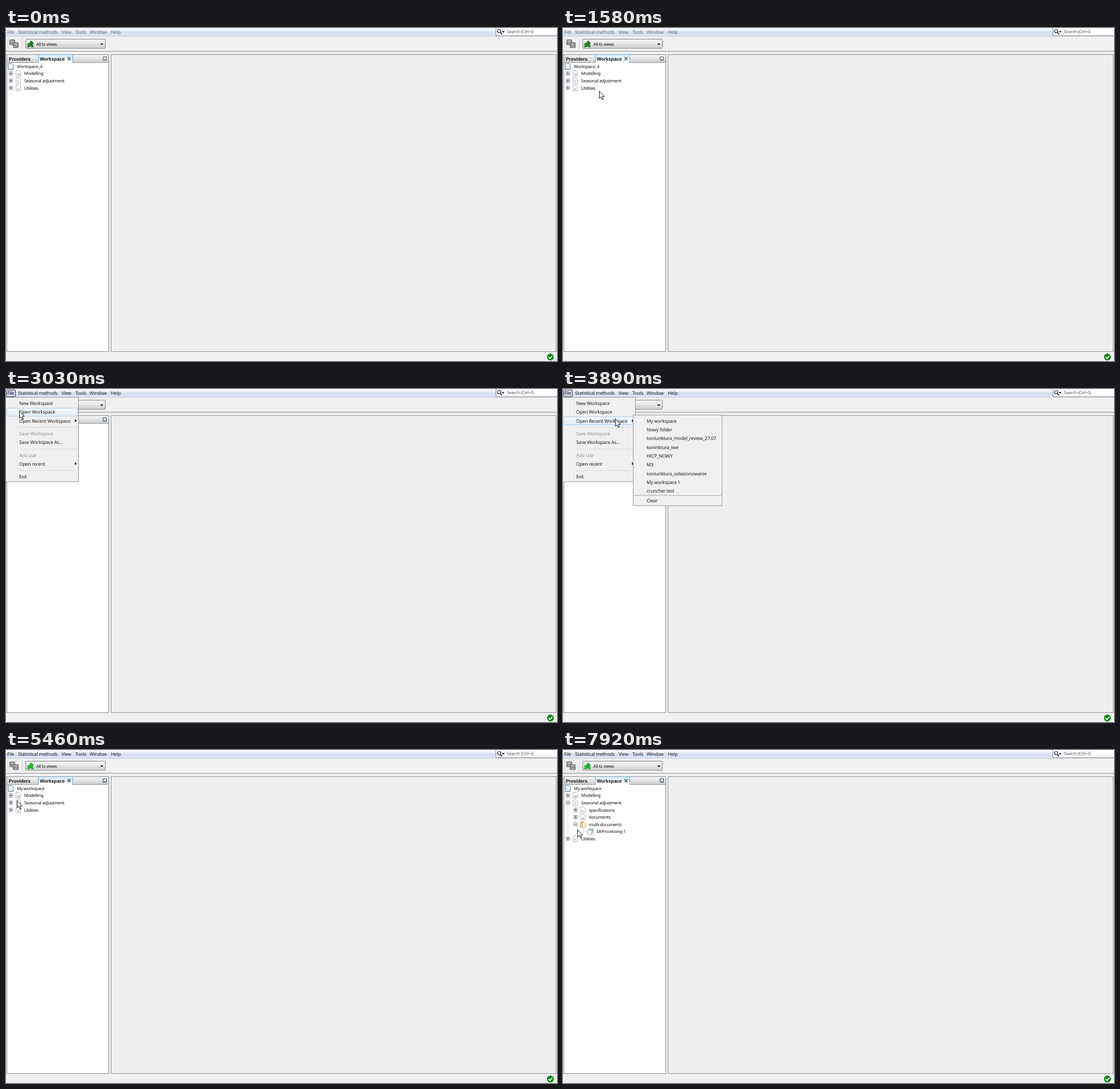
Write an HTML page that moves like this. It is 962 px wide and 582 px high and loops after 8 s.

```html
<!DOCTYPE html>
<html lang="en">
<head>
<meta charset="utf-8">
<title>Opening a workspace</title>
<style>
html, body { margin: 0; width: 100%; height: 100%; overflow: hidden; background: #f0f0f0; }
svg { display: block; width: 962px; height: 582px; }
text { text-rendering: geometricPrecision; white-space: pre; fill: #111; }
.tree { font: 7.6px "Noto Sans", sans-serif; letter-spacing: -.24px; }
.menu { font: 8.2px "Open Sans", sans-serif; letter-spacing: -.18px; }
.tab { font: bold 8.2px "Liberation Sans", sans-serif; }
.mini { font: 5px "Noto Sans", sans-serif; fill: #666; }
.off { fill: #8c8c84; }
#bar text { fill: #6d6d6d; }
.active #bar text { fill: #111; }
.puzzle { fill: #237a27; }
.active .puzzle { fill: #28b02e; }
.mark { stroke: #555; }
.active .mark { stroke: #25405c; }
</style>
</head>
<body>
<svg id="stage" viewBox="0 0 962 582"></svg>
<script>
const LOOP = 8000;
const MENU_OPEN = 2350, SUB_OPEN = 3580, PICKED = 4580, EXPAND = 6220, EXPAND_MULTI = 7370;

const rect = (x, y, w, h, fill, stroke = 'none', extra = '') =>
  `<rect x="${x}" y="${y}" width="${w}" height="${h}" fill="${fill}" stroke="${stroke}" ${extra}/>`;
const path = (d, fill = 'none', stroke = 'none', extra = '') =>
  `<path d="${d}" fill="${fill}" stroke="${stroke}" ${extra}/>`;
const text = (x, cy, s, cls = 'tree') => `<text x="${x}" y="${cy + 2.8}" class="${cls}">${s}</text>`;
const group = (id, body, extra = '') => `<g id="${id}" ${extra}>${body}</g>`;
const fade = (id, ...stops) => `<linearGradient id="${id}" x2="0" y2="1">` +
  stops.map(([o, c]) => `<stop offset="${o}" stop-color="${c}"/>`).join('') + '</linearGradient>';

const defs = `<defs>${
  fade('barFill', [0, '#fbfcfe'], [.4, '#e6ebf5'], [.45, '#d5dcec'], [1, '#dce3f2'])}${
  fade('comboFill', [0, '#f3f3f3'], [.5, '#e9e9e9'], [.52, '#dedede'], [1, '#d2d2d2'])}${
  fade('headFill', [0, '#f4f4f4'], [.5, '#e4e4e4'], [1, '#cbcbcb'])}${
  fade('tabFill', [0, '#d8ecf9'], [.5, '#e8f4fc'], [1, '#fbfdff'])}${
  fade('pageFill', [0, '#ffffff'], [1, '#d3e2f3'])}${
  fade('hoverFill', [0, '#f3f7fc'], [1, '#e4eefb'])}</defs>`;

function menuBar() {
  const items = [[2, 'File'], [21, 'Statistical methods'], [97, 'View'], [121, 'Tools'], [146, 'Window'], [183, 'Help']];
  return rect(0, 0, 962, 14, 'url(#barFill)') + rect(0, 14, 962, 1, '#c9cedb') +
    group('fileButton', rect(.5, 1.5, 16, 12, '#cdd4e6', '#4b4f5c', 'rx="1.5"')) +
    group('bar', items.map(([x, s]) => text(x, 7.5, s, 'menu')).join('')) +
    rect(855.5, -.5, 107, 14, '#fff', '#8b909b') +
    '<circle cx="861" cy="5.5" r="3" fill="#dcebf7" stroke="#333" stroke-width="1.2"/>' +
    path('M863.2 7.8l3 3.2', 'none', '#222', 'stroke-width="1.8"') +
    path('M865.5 5.5h5l-2.5 2.8z', '#111') +
    `<g opacity=".7">${text(874.5, 6.5, 'Search (Ctrl+I)')}</g>`;
}

function toolBar() {
  const grip = x => path(`M${x} 19v18`, 'none', '#9a9a9a', 'stroke-dasharray="1 1.5"');
  const disk = (x, y) => rect(x, y, 9, 9, '#8d8d8d', '#6f6f6f', 'rx="1"') +
    rect(x + 2, y + 1, 5, 3, '#b9b9b9') + rect(x + 2, y + 6, 5, 2.5, '#a6a6a6');
  return rect(0, 40, 962, 1, '#a2a2a2') + rect(0, 41, 962, 1, '#dcdcdc') +
    grip(3.5) + grip(28.5) + disk(6.5, 20.5) + disk(12.5, 25.5) +
    rect(34.5, 19.5, 139, 16, 'url(#comboFill)', '#8a8a8a', 'rx="1.5"') +
    '<path class="puzzle" d="M37 27h3v-1.5h2V22.500h4V25h2v3.500h-1.500v1.500H48v3.500h-4v-1.500h-2v1.500h-5v-3h1.500v-1.500H37z"/>' +
    text(53, 28, 'All ts views') + path('M164.500 27h5.500l-2.750 3z', '#111');
}

function panels() {
  return rect(1.5, 46.5, 178, 519, '#fff', '#8c8f95') +
    rect(2, 47, 177, 13, 'url(#headFill)') + rect(2, 60, 177, 1, '#a5a9ae') +
    rect(56.5, 46.5, 60, 14, 'url(#tabFill)', '#76a7c8') + rect(57, 60, 59, 1, '#fff') +
    text(5, 53.8, 'Providers', 'tab') + text(59, 53.8, 'Workspace', 'tab') +
    '<path class="mark" d="M107.500 51l5 5m0-5l-5 5M107.500 51h1.500m2 0h1.500M107.500 56h1.500m2 0h1.500" fill="none" stroke-width="1.1"/>' +
    '<path class="mark" d="M169.500 50.500h6v6h-6zM171 54.500h3" fill="#f6f6f6"/>' +
    rect(183.5, 46.5, 777, 519, '#efefef', '#8f9298') +
    '<circle cx="950.5" cy="575" r="6" fill="#11851a"/>' +
    path('M947.300 575.200l2.400 2.400 4.200-4.800', 'none', '#fff', 'stroke-width="1.7"');
}

function page(x, cy, letter) {
  const y = cy - 5;
  if (letter === '=') {
    return path(`M${x} ${y + .5}h5v9h-5z`, '#f3d67c', '#c19a3a', 'stroke-width=".8"') +
      path(`M${x + 3} ${y + 1.5}h4l2 2v6.500h-6z`, '#fdf6dd', '#a88d4b', 'stroke-width=".8"');
  }
  if (letter === '+') {
    return path(`M${x + 2} ${y}h7v8h-7z`, '#eef4f8', '#7d93a0', 'stroke-width=".8"') +
      path(`M${x - .500} ${y + 2}h5l2 2v6h-7z`, '#fff', '#7d93a0', 'stroke-width=".8"') +
      path(`M${x + 5} ${y + 2}h2.500v3`, 'none', '#3f8f9c');
  }
  return path(`M${x + .5} ${y}h5.500l2.500 2.500v7.500h-8z`, '#fbfbfb', '#a3a8ad', 'stroke-width=".8"') +
    `<text x="${x + 2.8}" y="${cy + 3.2}" class="mini">${letter}</text>`;
}

// Each row: depth, expander sign, icon letter, label
function tree(id, title, rows) {
  const rowY = i => 79.6 + i * 12.57;
  const dots = d => path(d, 'none', '#b5b5b5', 'stroke-dasharray="1 1"');
  const stem = depth => {
    const own = rows.map((r, i) => r[0] === depth ? i : -1).filter(i => i >= 0);
    if (!own.length) return '';
    const x = 8.5 + depth * 13.3;
    return dots(`M${x} ${rowY(own[0]) - 6}V${rowY(own[own.length - 1])}`);
  };
  const body = rows.map(([depth, sign, letter, label], i) => {
    const x = 8.5 + depth * 13.3, y = rowY(i);
    const box = sign && rect(x - 3, y - 3, 6, 6, '#fafafa', '#8d939b', 'stroke-width=".9"') +
      path(`M${x - 2} ${y}h4` + (sign === '+' ? `M${x} ${y - 2}v4` : ''), 'none', '#26344d');
    return dots(`M${x} ${y}h8`) + box + page(x + 8.5, y, letter) + text(x + 23.3, y, label);
  }).join('');
  return group(id,
    path('M4 62h6l3 3v7.500h-9z', 'url(#pageFill)', '#5c6b7c', 'stroke-width=".9"') +
    text(19, 67, title) + [0, 1, 2].map(stem).join('') + body);
}

const modelling = [0, '+', 'M', 'Modelling'], utilities = [0, '+', 'U', 'Utilities'];
const closed = [modelling, [0, '+', 'S', 'Seasonal adjustment'], utilities];
const opened = (sign, ...files) => [modelling, [0, '-', 'S', 'Seasonal adjustment'],
  [1, '+', 's', 'specifications'], [1, '+', 'd', 'documents'], [1, sign, '=', 'multi-documents'],
  ...files, utilities];

const hover = (id, x, y, w) => rect(x + .5, y + .5, w, 14, 'url(#hoverFill)', '#b4d2f0', `id="${id}" rx="1.5"`);

function fileMenu() {
  const items = [[25, 'New Workspace'], [40.5, 'Open Workspace'], [56, 'Open Recent Workspace'],
    [78, 'Save Workspace', 'off'], [93.5, 'Save Workspace As...'], [116, 'Add star', 'off'],
    [131, 'Open recent'], [153.5, 'Exit']];
  return group('fileMenu',
    rect(-.5, 14.5, 127, 147.5, '#f0f0f0', '#999') +
    rect(20, 16, 1, 145, '#e1e1e1') + rect(21, 16, 1, 145, '#fbfbfb') +
    [66.5, 104.5, 142].map(y => rect(22, y, 103, 1, '#dcdcdc')).join('') +
    hover('row0', 1, 17, 124) + hover('row1', 1, 33, 124) + hover('row2', 1, 48, 124) +
    items.map(([y, s, cls = '']) => text(23, y, s, 'menu ' + cls)).join('') +
    [55.5, 130.5].map(y => path(`M120.500 ${y - 2.8}l3 2.800-3 2.800z`, '#111')).join(''));
}

function recentMenu() {
  const names = ['My workspace', 'Nowy folder', 'koniunktura_model_review_27.07', 'koninktura_Iwe',
    'HICP_NOWY', 'M3', 'koniunktura_odsezonowanie', 'My workspace 1', 'cruncher test'];
  return group('recentMenu',
    rect(122.5, 45.5, 155, 158.5, '#f0f0f0', '#999') + hover('pick', 124, 48, 152) +
    names.map((s, i) => text(146, 56 + i * 15.33, s, 'menu')).join('') +
    rect(124, 185.5, 152, 1, '#a5a5a5') + text(146, 195.3, 'Clear', 'menu'));
}

const arrow = group('cursor',
  path('M.5 .5v12.500l2.900-2.500 2.200 4.700 1.900-.900-2.100-4.500h3.800z', '#fff', '#111', 'stroke-width=".95"'));

const stage = document.getElementById('stage');
stage.innerHTML = defs + menuBar() + toolBar() + panels() +
  tree('treeStart', 'Workspace_4', closed) +
  tree('treePicked', 'My workspace', closed) +
  tree('treeOpen', 'My workspace', opened('+')) +
  tree('treeFull', 'My workspace', opened('-', [2, '', '+', 'SAProcessing-1'])) +
  fileMenu() + recentMenu() + arrow;

// Pointer track: time, x, y
const track = [
  [480, 866, 552], [670, 640, 460], [870, 440, 352], [1070, 288, 262], [1260, 177, 192],
  [1420, 112, 148], [1580, 63, 110], [1780, 27, 57], [2020, 10, 5], [2580, 10, 5],
  [2800, 16, 21], [3030, 23, 38], [3410, 25, 48], [3640, 45, 49], [3890, 91, 52],
  [4190, 161, 56], [4980, 161, 56], [5220, 88, 73], [5460, 19, 88], [5630, 1, 88],
  [5720, 1, 88], [6060, 5, 91], [6700, 5, 91], [6770, 10, 102], [7000, 16, 118],
  [7220, 19, 128], [7690, 19, 128], [7920, 25, 139], [LOOP, 25, 139]
];

function pointerAt(t) {
  const i = Math.max(1, track.findIndex(k => k[0] > t));
  const [t0, x0, y0] = track[i - 1], [t1, x1, y1] = track[i];
  const u = (t - t0) / (t1 - t0);
  return [Math.round(x0 + (x1 - x0) * u), Math.round(y0 + (y1 - y0) * u)];
}

const show = (id, on) => { document.getElementById(id).style.display = on ? '' : 'none'; };

function draw(now) {
  const t = now % LOOP, [x, y] = pointerAt(t);
  const menu = t >= MENU_OPEN && t < PICKED;
  stage.classList.toggle('active', t >= MENU_OPEN);
  show('fileButton', menu);
  show('fileMenu', menu);
  show('recentMenu', menu && t >= SUB_OPEN);
  show('row0', y >= 17 && y < 33);
  show('row1', y >= 33 && y < 48);
  show('row2', y >= 48);
  show('pick', x > 123);
  show('treeStart', t < PICKED);
  show('treePicked', t >= PICKED && t < EXPAND);
  show('treeOpen', t >= EXPAND && t < EXPAND_MULTI);
  show('treeFull', t >= EXPAND_MULTI);
  show('cursor', t >= 480);
  document.getElementById('cursor').setAttribute('transform', `translate(${x} ${y})`);
  requestAnimationFrame(() => draw(performance.now()));
}
draw(performance.now());
</script>
</body>
</html>
```
